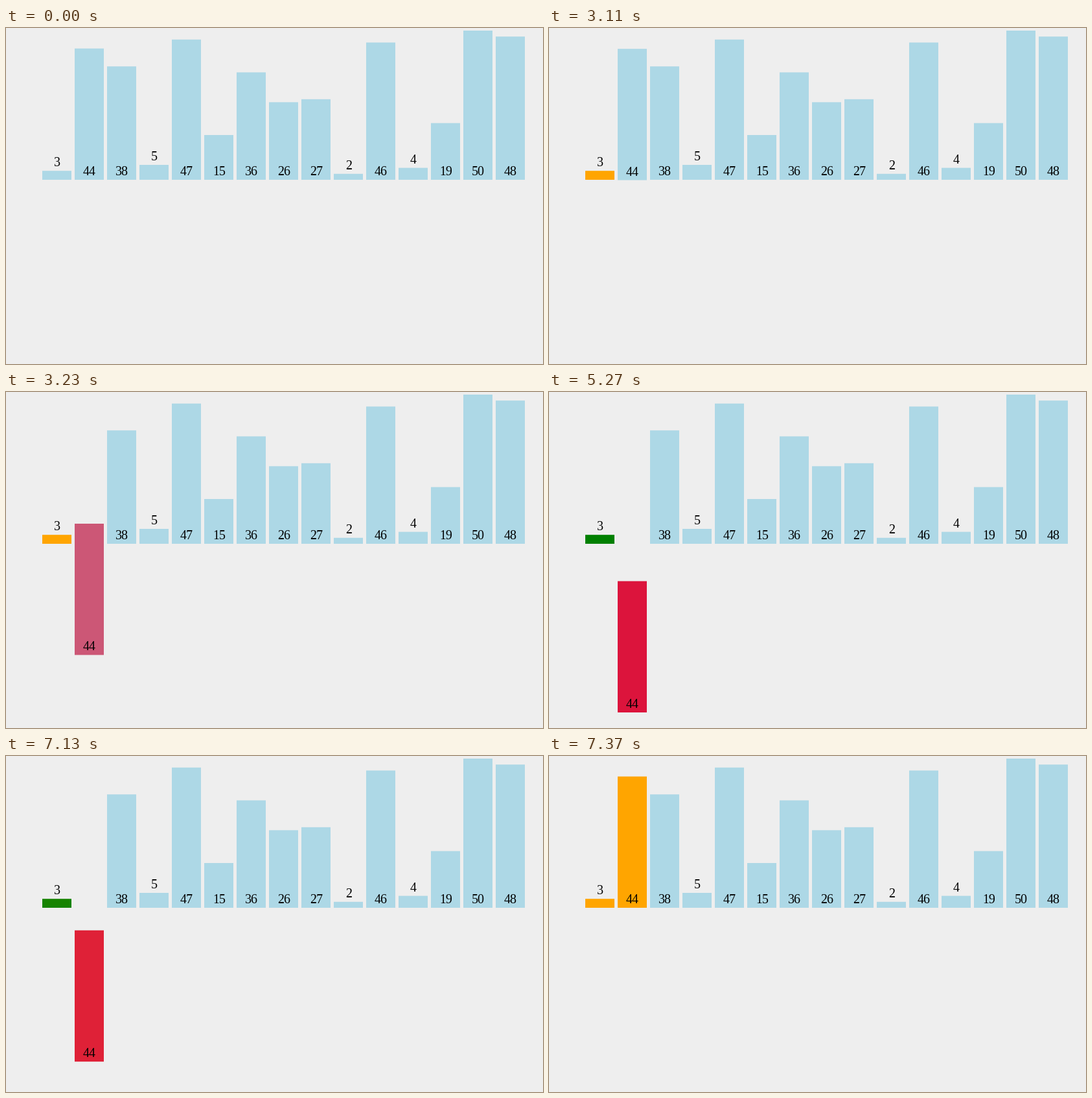
Recreate the animation shown at these times as a matplotlib script. Size 829 px wide and 518 px high, loop 8000 ms.

```python
import matplotlib.pyplot as plt
import numpy as np
from matplotlib.animation import FuncAnimation
from matplotlib.colors import to_rgb
from matplotlib.patches import Rectangle

W, H, DPI = 829, 518, 64
LOOP, STEP = 8000, 20

VALUES = [3, 44, 38, 5, 47, 15, 36, 26, 27, 2, 46, 4, 19, 50, 48]
LEFT, PITCH, BAR_W = 56, 50, 45
BASE, UNIT, DROP = 234, 4.6, 260
LABEL_GAP = 7

PLAIN, SORTED, KEY, COMPARE = map(
    to_rgb, ("lightblue", "orange", "crimson", "green"))

MOVE_MS, TICK = 250, 120
MARK_AT, LOWER_AT, COMPARE_AT, RAISE_AT = 1340, 3110, 5270, 7130


def ease(u):
    """Cubic in-out."""
    u = np.clip(u, 0, 1)
    return 4 * u**3 if u < 0.5 else 1 - 4 * (1 - u)**3


def progress(t, first, lead):
    """Eased share of a move that is redrawn once per tick from `first`."""
    if t < first:
        return 0.0
    return ease((lead + (t - first) // TICK * TICK) / MOVE_MS)


def mix(a, b, p):
    return tuple(np.add(np.multiply(a, 1 - p), np.multiply(b, p)))


fig = plt.figure(figsize=(W / DPI, H / DPI), dpi=DPI, facecolor="#eeeeee")
ax = fig.add_axes([0, 0, 1, 1])
ax.set(xlim=(0, W), ylim=(H, 0))
ax.axis("off")


def add_bar(i, value):
    x, height = LEFT + PITCH * i, value * UNIT
    bar = Rectangle((x, BASE - height), BAR_W, height,
                    facecolor=PLAIN, linewidth=0, snap=False)
    ax.add_patch(bar)
    foot = BASE - height if value < 10 else BASE
    label = ax.text(x + 23, foot - LABEL_GAP, str(value), color="black",
                    family="Liberation Serif", fontsize=20 * 72 / DPI,
                    ha="center", va="baseline")
    return bar, label


bars, labels = zip(*(add_bar(i, v) for i, v in enumerate(VALUES)))


def update(frame):
    t = frame * STEP + STEP // 2
    down = progress(t, LOWER_AT, 20)
    up = progress(t, RAISE_AT, 70)

    if t < MARK_AT:
        first = PLAIN
    elif t < COMPARE_AT:
        first = SORTED
    else:
        first = mix(COMPARE, SORTED, up)
    bars[0].set_facecolor(first)

    dy = DROP * (down - up)
    bars[1].set_y(BASE - VALUES[1] * UNIT + dy)
    labels[1].set_y(BASE - LABEL_GAP + dy)
    bars[1].set_facecolor(mix(mix(PLAIN, KEY, down), SORTED, up))
    return bars[0], bars[1], labels[1]


anim = FuncAnimation(fig, update, frames=LOOP // STEP, interval=STEP,
                     repeat=True, repeat_delay=0)
plt.show()
```
